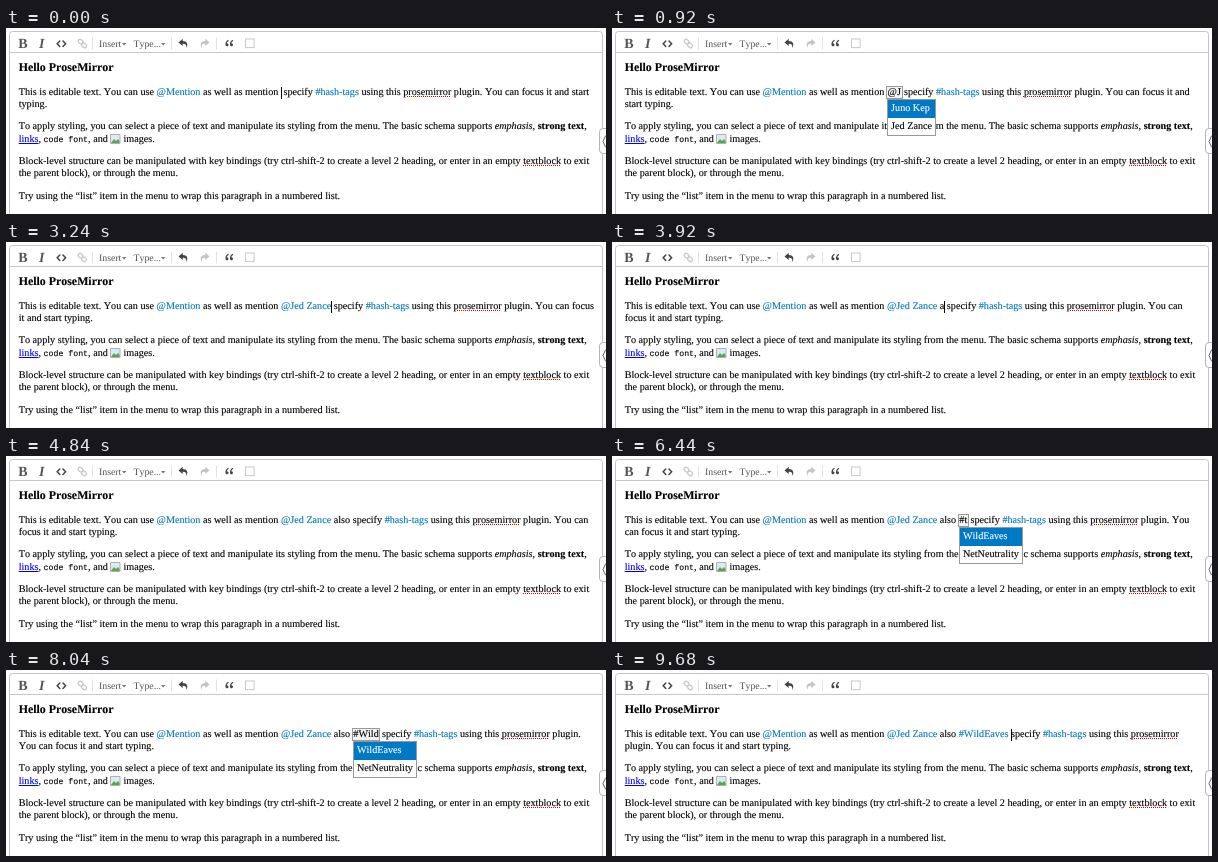
An HTML page for the animation above (9840 ms loop, 600x186 px).

```html
<!DOCTYPE html>
<html lang="en">
<head>
<meta charset="utf-8">
<title>Editor with mentions</title>
<style>
html, body { margin: 0; width: 100%; height: 100%; overflow: hidden; background: #fff; }
body { position: relative; color: #000; font: 10.18px/12.4px "Liberation Serif", Times, serif; font-kerning: none; text-rendering: geometricPrecision; -webkit-text-stroke: .12px; }
svg.chrome { position: absolute; left: 0; top: 0; }
h3, p { position: absolute; left: 12.7px; margin: 0; white-space: pre; }
h3 { top: 32.4px; font-size: 11.9px; line-height: 15px; }
u { text-decoration: underline dotted #e00000 1.4px; text-underline-offset: 1.2px; }
a { color: #00e; text-decoration: underline; }
code { font: 8.24px "Liberation Mono", monospace; line-height: 0; }
p svg { vertical-align: -2px; }
.node { color: #0077bf; }
.tag { padding: 0 .65px; background: #f3f3f3; outline: 1px solid #999; outline-offset: -.6px; }
.caret { position: absolute; width: 1px; height: 12px; background: #000; }
.list { position: absolute; z-index: 1; margin-top: 12.6px; border: 1px solid #999; background: #fff; }
.list div { padding: 2.8px 3.2px 2.3px; }
.list .on { background: #0079c4; color: #fff; }
</style>
</head>
<body>
<svg class="chrome" width="600" height="186" fill="none" stroke-linecap="round">
  <path d="M3.5 186V6.5a3 3 0 0 1 3-3H593.5a3 3 0 0 1 3 3V186" stroke="#c4c4c4"/>
  <path d="M4 24.5H596" stroke="#c8c8c8"/>
  <path d="M86.5 10V21M165.5 10V21M210.5 10V21" stroke="#e2e2e2"/>
  <g fill="#555" font-weight="bold" font-size="14">
    <text x="12.2" y="20">B</text>
    <text x="33" y="20" font-style="italic">I</text>
    <g font-weight="normal" font-size="9.8"><text x="93" y="19">Insert</text><text x="127.5" y="19">Type...</text></g>
    <path d="M116 15h4.4l-2.2 2.6zM155 15h4.4l-2.2 2.6z" fill="#777"/>
  </g>
  <path d="M53.8 13l-2.6 2.7 2.6 2.7M57 13l2.6 2.7-2.6 2.7" stroke="#444" stroke-width="1.5"/>
  <g stroke="#c8c8c8" stroke-width="1.3">
    <rect x="72" y="11.6" width="5" height="4" rx="1.8" transform="rotate(42 74.5 13.6)"/>
    <rect x="75.6" y="15.4" width="5" height="4" rx="1.8" transform="rotate(42 78.1 17.4)"/>
    <rect x="239.5" y="11" width="8.6" height="8.6" stroke-width="1"/>
  </g>
  <defs><path id="arrow" d="M172.5 14.4l4.2-3.7v2.3c4.5 0 6 3.4 3.3 7 .8-3.2-.4-4.2-3.3-4.2v2.3z"/></defs>
  <use href="#arrow" fill="#444"/>
  <use href="#arrow" fill="#c4c4c4" transform="matrix(-1 0 0 1 376 0)"/>
  <defs><path id="quote" d="M222.6 11.8c-2.4.7-3.4 2.6-3.1 5.2.3 1.8 3 1.7 3-.2 0-1-.7-1.5-1.6-1.4 0-1.3.6-2 1.7-2.5z"/></defs>
  <use href="#quote" fill="#444"/>
  <use href="#quote" fill="#444" x="4.5"/>
  <path d="M601 100.5H597a3.5 3.5 0 0 0-3.5 3.5V122a3.5 3.5 0 0 0 3.5 3.5H601" fill="#fff" stroke="#b4b4b4"/>
  <path d="M599.5 108l-2.5 5.5 2.5 5.5" stroke="#666"/>
</svg>
<h3>Hello ProseMirror</h3>
<p id="live" style="top:58.8px"></p>
<p style="top:93.2px">To apply styling, you can select a piece of text and manipulate its styling from the menu. The basic schema supports <em>emphasis</em>, <b>strong text</b>,
<a>links</a>, <code>code font</code>, and <svg width="10.5" height="10"><path d="M.5.5h9.5v9h-9.5z" fill="#dce9f7" stroke="#b0b0b0"/><path d="M1 9l3-4 2 2 2-2 1.5 2v2z" fill="#58a552"/></svg> images.</p>
<p style="top:127.8px">Block-level structure can be manipulated with key bindings (try ctrl-shift-2 to create a level 2 heading, or enter in an empty <u>textblock</u> to exit
the parent block), or through the menu.</p>
<p style="top:162.7px">Try using the “list” item in the menu to wrap this paragraph in a numbered list.</p>
<script>
const LOOP = 9840, BLINK = 500;
const node = s => `<span class="node">${s}</span>`;
const lead = `This is editable text. You can use ${node('@Mention')} as well as mention `;
const rest = `specify ${node('#hash-tags')} using this <u>prosemirror</u> plugin. You can focus it and start typing.`;
const who = node('@Jed Zance'), also = who + ' also ';

// Edits: start time, inserted text (| caret, [ ] open tag), first word of line two
const edits = [
  [0, '| ', 'typing'],
  [80, '[@|] ', 'typing'],
  [420, '[@J|] ', 'start'],
  [2240, who + '| ', 'it'],
  [3560, who + ' | ', 'it'],
  [3920, who + ' a| ', 'focus'],
  [4080, who + ' al| ', 'focus'],
  [4200, who + ' als| ', 'focus'],
  [4340, who + ' also| ', 'focus'],
  [5080, also + '| ', 'focus'],
  [5520, also + '[#|] ', 'focus'],
  [5940, also + '[#t|] ', 'can'],
  [6660, also + '[#|] ', 'focus'],
  [7000, also + '[#W|] ', 'can'],
  [7160, also + '[#Wi|] ', 'can'],
  [7340, also + '[#Wil|] ', 'can'],
  [7520, also + '[#Wild|] ', 'You'],
  [8520, also + node('#WildEaves') + '| ', 'plugin'],
  [9680, also + node('#WildEaves') + ' |', 'plugin']
];

function list(t) {
  const people = t >= 920 && t < 2240, topics = t >= 6440 && t < 8520;
  if (!people && !topics) return '';
  const items = people ? ['Juno Kep', 'Jed Zance'] : ['WildEaves', 'NetNeutrality'];
  const active = people && t >= 1440 ? 1 : 0;
  return '<span class="list">' +
    items.map((s, i) => `<div${i === active ? ' class="on"' : ''}>${s}</div>`).join('') + '</span>';
}

const live = document.getElementById('live');
let shown;
function draw(t) {
  const [start, text, word] = edits.findLast(e => e[0] <= t);
  const caret = (t - start) % (2 * BLINK) < BLINK ? '<span class="caret"></span>' : '';
  const html = lead +
    text.replace('[', list(t) + '<span class="tag">').replace(']', '</span>').replace('|', caret) +
    rest.replace(' ' + word, '\n' + word);
  if (html !== shown) live.innerHTML = shown = html;
}

const begin = performance.now();
function tick() {
  draw((performance.now() - begin) % LOOP);
  requestAnimationFrame(tick);
}
tick();
</script>
</body>
</html>
```
